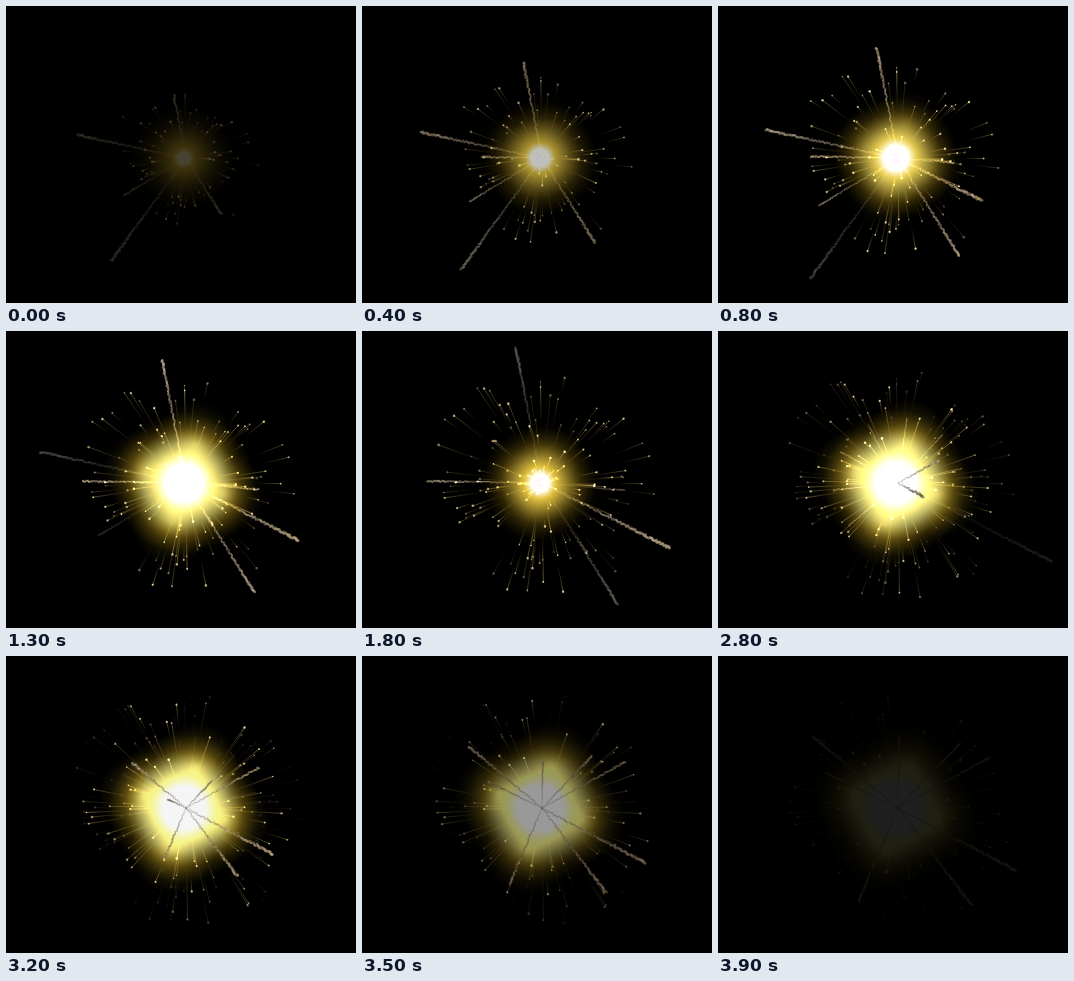
An HTML page with a canvas for the animation above (4.1 s loop, 350 by 297 pixels).

```html
<!DOCTYPE html>
<html>
<head>
<meta charset="utf-8">
<style>
html, body { margin: 0; height: 100%; overflow: hidden; background: #000; }
canvas { display: block; }
</style>
</head>
<body>
<canvas id="stage" width="350" height="297"></canvas>
<script>
const ctx = document.getElementById('stage').getContext('2d');
const W = 350, H = 297, CX = 180, CY = 152, LOOP = 4100, STEP = 100;
const RAD = Math.PI / 180;

const clamp = v => Math.max(0, Math.min(1, v));
const noise = n => { const s = Math.sin(n * 127.1 + 11.7) * 43758.5453; return s - Math.floor(s); };
const comet = (angle, birth, reach) => ({ angle: angle * RAD, birth, reach });

const opening = [
  comet(192, -.9, 1), comet(126, -1.4, 1), comet(259, -.28, .95), comet(58, -.28, .98),
  comet(181, .1, .85), comet(149, -.65, .72), comet(27, .38, 1.12), comet(5, .35, .65)
];
const middle = Array.from({ length: 7 }, (_, i) => comet(139 + 34.7 * i, 1.7, .55));
const closing = [28, 53, 220, 113, 314, 206, 271]
  .map((angle, i) => comet(angle, 2.72 + .08 * i, 1.1 - .07 * i))
  .concat(comet(-29, 2.6, .85));

const sparks = Array.from({ length: 160 }, (_, i) => ({
  angle: (i + noise(i)) * 2.39996,
  reach: 55 + 67 * noise(i + 300),
  birth: i % 2 ? -.8 + .4 * noise(i + 600) : 2.4 * noise(i + 600),
  light: .3 + .55 * noise(i + 900),
  tail: .45 + .4 * noise(i + 1200)
}));

// Radius of the white core over time (s)
const coreKeys = [[0, 7], [.8, 16], [1.3, 25], [2.2, 1], [2.8, 27], [3.9, 30]];

function coreAt(t) {
  const k = Math.max(1, coreKeys.findIndex(key => key[0] >= t));
  const [t0, a] = coreKeys[k - 1], [t1, b] = coreKeys[k];
  return a + (b - a) * (t - t0) / (t1 - t0);
}

function dot(x, y, r, fill) {
  ctx.fillStyle = fill;
  ctx.beginPath();
  ctx.arc(x, y, r, 0, 7);
  ctx.fill();
}

function glow(x, y, r, stops) {
  const g = ctx.createRadialGradient(x, y, 0, x, y, r);
  stops.forEach(([at, color]) => g.addColorStop(at, color));
  dot(x, y, r, g);
}

function drawSpark(s, t) {
  const age = t - s.birth;
  if (age <= 0) return;
  const r = s.reach * (1 - Math.exp(-age / .8));
  const alpha = s.light * clamp((4.2 - age) / 2);
  const dx = Math.cos(s.angle), dy = Math.sin(s.angle);
  const x = CX + dx * r, y = CY + dy * r;
  const x0 = CX + dx * r * s.tail, y0 = CY + dy * r * s.tail;
  const g = ctx.createLinearGradient(x0, y0, x, y);
  g.addColorStop(0, 'rgba(190,150,40,0)');
  g.addColorStop(1, `rgba(215,190,115,${alpha * .7})`);
  ctx.strokeStyle = g;
  ctx.lineWidth = .8;
  ctx.beginPath();
  ctx.moveTo(x0, y0);
  ctx.lineTo(x, y);
  ctx.stroke();
  dot(x, y, .7 + .6 * noise(s.reach), `rgba(235,215,155,${alpha})`);
}

function drawComet({ angle, birth, reach }, t) {
  const age = t - birth;
  const fade = clamp(Math.min(2.6, 3.2 * reach) - age) ** 1.3;
  if (age <= 0 || !fade) return;
  const r = reach * (27 * age + 90 * (1 - Math.exp(-age / .25)));
  const dx = Math.cos(angle), dy = Math.sin(angle), width = 1.7 * reach;
  const grey = clamp(age / 2.4);
  for (let d = 0; d < r; d++) {
    const n = d + angle * 100, p = d / r;
    const side = (noise(n + .5) - .5) * width;
    const shade = (.3 + .6 * clamp(d / 50)) * (.55 + .45 * noise(n + .3));
    const cool = Math.max(grey, noise(n));
    const rgb = [235, 185 + 40 * cool, 105 + 105 * cool].map(c => Math.round(c * shade));
    dot(CX + dx * d - dy * side, CY + dy * d + dx * side,
      width * (.35 + .45 * p), `rgba(${rgb},${fade * (.25 + .45 * p)})`);
  }
}

function drawFlare(t) {
  const core = coreAt(t), outer = 44 + 1.1 * core, x = CX - 2;
  const edge = core / outer, at = v => edge + (1 - edge) * v;
  const lobe = .55 * (core / 28) ** 2;
  for (let i = 0; i < 4; i++) {
    const a = (16 + 90 * i) * RAD, d = outer * .58;
    glow(x + Math.cos(a) * d, CY + Math.sin(a) * d, outer * .58, [
      [0, `rgba(205,180,65,${lobe})`], [.5, `rgba(165,140,35,${lobe * .45})`],
      [1, 'rgba(120,100,10,0)']
    ]);
  }
  const tint = `255,${Math.round(195 + 2 * core)},${Math.round(15 + 5 * core)}`;
  glow(x, CY, outer, [
    [0, `rgb(255,${Math.round(225 + core)},${Math.round(Math.min(255, 80 + 16 * core))})`],
    [edge * .75, `rgb(255,255,${Math.round(Math.min(255, 60 + 16 * core))})`],
    [at(.1), `rgba(${tint},.85)`], [at(.35), `rgba(${tint},.5)`],
    [at(.65), 'rgba(190,150,20,.22)'], [1, 'rgba(120,95,0,0)']
  ]);
}

function draw(now) {
  const t = Math.min(39, Math.floor(now % LOOP / STEP)) / 10;
  const level = Math.min(1, .27 + 1.2 * t, .12 + 1.2 * (3.9 - t));
  ctx.globalCompositeOperation = 'source-over';
  ctx.fillStyle = '#000';
  ctx.fillRect(0, 0, W, H);
  opening.concat(middle).forEach(c => drawComet(c, t));
  ctx.globalCompositeOperation = 'lighter';
  sparks.forEach(s => drawSpark(s, t));
  drawFlare(t);
  ctx.globalCompositeOperation = 'source-over';
  closing.forEach(c => drawComet(c, t));
  ctx.fillStyle = `rgba(0,0,0,${1 - level})`;
  ctx.fillRect(0, 0, W, H);
  requestAnimationFrame(draw);
}
requestAnimationFrame(draw);
</script>
</body>
</html>
```
